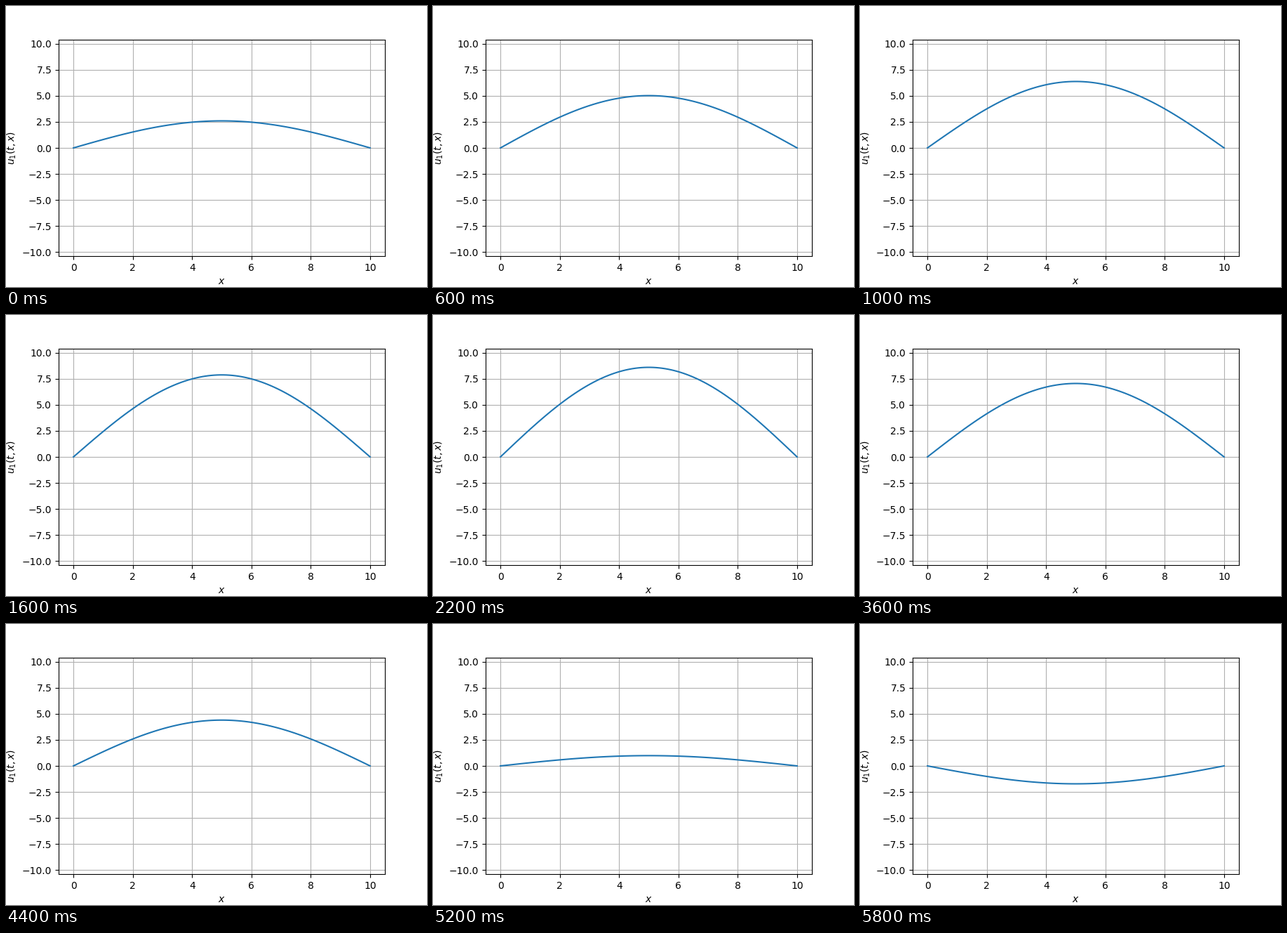
Write a matplotlib script that moves like this. It is 600 by 400 pixels and loops after 6000 ms.

```python
import numpy as np
import matplotlib.pyplot as plt
from matplotlib.animation import FuncAnimation

LENGTH = 10
AMPLITUDE = 5 * np.sqrt(3)
PHASE = np.arccos(0.3)
FRAMES = 30
INTERVAL = 200

x = np.linspace(0, LENGTH, 100)
mode = np.sin(np.pi * x / LENGTH)


def displacement(frame):
    """First standing mode; the loop covers half a period."""
    return AMPLITUDE * np.cos(np.pi * frame / FRAMES - PHASE) * mode


fig, ax = plt.subplots(figsize=(6, 4), dpi=100)
line, = ax.plot(x, displacement(0))
ax.set_xlim(-0.05 * LENGTH, 1.05 * LENGTH)
ax.set_ylim(-1.2 * AMPLITUDE, 1.2 * AMPLITUDE)
ax.set_xlabel("$x$")
ax.set_ylabel("$u_1(t, x)$")
ax.grid(True)


def update(frame):
    line.set_ydata(displacement(frame))
    return line,


anim = FuncAnimation(fig, update, frames=FRAMES, interval=INTERVAL, repeat=True)
plt.show()
```
